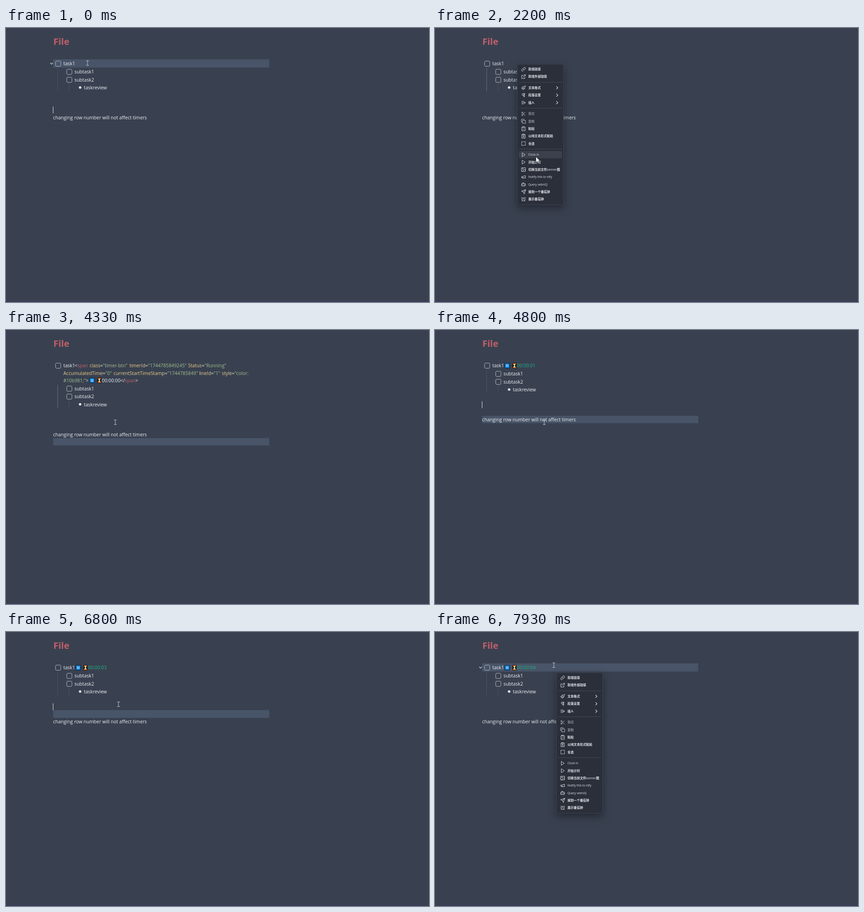
These frames come from a looping animation (929 by 603 pixels, 8 s). An HTML page with a canvas:

```html
<!DOCTYPE html>
<html lang="en">
<head>
<meta charset="utf-8">
<title>Task timer</title>
<style>
html, body { margin: 0; width: 100%; height: 100%; overflow: hidden; background: #394150; }
canvas { display: block; }
</style>
</head>
<body>
<canvas id="stage" width="929" height="603"></canvas>
<script>
const g = document.getElementById('stage').getContext('2d');
const LOOP = 8000;
const SANS = '"Open Sans", "Noto Sans", sans-serif';
const CJK = '"Noto Sans CJK SC", "Noto Sans CJK JP", "Noto Sans CJK", sans-serif';
const BODY = '10.3px ' + SANS;
const WHITE = '#eef0f4', RED = '#bf616a', YELLOW = '#ebcb8b', GREEN = '#a3be8c';

// Pointer stops: time, x, y
const PATH = [
  [0, 179, 77], [1270, 179, 77], [2000, 222, 284], [2200, 222, 284],
  [2530, 228, 334], [2930, 228, 334], [3530, 233, 300], [4200, 233, 300],
  [4330, 240, 203], [6600, 240, 203], [7070, 257, 92], [7400, 264, 88],
  [7470, 264, 86], [7700, 264, 86], [7900, 261, 73], [LOOP, 261, 73]
];
const CLICKS = [[530, 179, 77], [3670, 231, 299], [4440, 240, 203], [7470, 264, 86]];
const ROW_TOPS = [69, 87, 104.5, 122, 140, 156, 172, 188.5, 205, 221];

// Icons on a 24-unit grid
const CLIP = 'M9 2h6v4H9zM16 4h4v18H4V4h4';
const PLAY = 'M6 3 20 12 6 21z';
const ICONS = {
  link: 'M10 13a5 5 0 0 0 7.5.5l3-3a5 5 0 0 0-7-7l-1.7 1.7M14 11a5 5 0 0 0-7.5-.5l-3 3a5 5 0 0 0 7 7l1.7-1.7',
  open: 'M15 3h6v6M10 14 21 3M18 13v8H3V6h8',
  brush: 'M20 2 14 7l-3-2-3 2 9 9 2-3-2-3 5-6zM9 8c-2 3-4 3.5-7 4l8 10c2-1 6-5 6-7M14 17 5 15',
  para: 'M13 4v16M17 4v16M19 4H9.5a4.5 4.5 0 0 0 0 9H13',
  insert: 'M3 6h11M3 12h18M3 18h11M17 8l4 4-4 4',
  cut: 'M3 6a3 3 0 1 0 6 0 3 3 0 1 0-6 0M3 18a3 3 0 1 0 6 0 3 3 0 1 0-6 0M20 4 8 16M14.5 14.5 20 20M8 8l4 4',
  copy: 'M8 8h14v14H8zM4 16H2V2h14v2',
  paste: CLIP + 'M9 14l2 2 4-4',
  plain: CLIP + 'M9 12v-1h6v1M11 17h2M12 11v6',
  all: 'M3 6V3h3M9 3h2M14 3h2M18 3h3v3M21 9v2M21 14v2M21 18v3h-3M15 21h-2M10 21H8M6 21H3v-3M3 15v-2M3 10V8',
  play: PLAY,
  image: 'M3 3h18v18H3zM7 9a2 2 0 1 0 4 0 2 2 0 1 0-4 0M21 15l-4-4L6 21',
  horn: 'M3 11 21 6v12L3 14zM11.6 16.8a3 3 0 1 1-5.8-1.6',
  bot: 'M12 8V4H8M4 8h16v12H4zM2 14h2M20 14h2M15 13v2M9 13v2',
  send: 'M22 2 2 9l9 4 4 9zM22 2 11 13',
  alarm: 'M4 13a8 8 0 1 0 16 0 8 8 0 1 0-16 0M12 9v4l2 2M5 3 2 6M22 6l-3-3M6.4 18.7 4 21M17.6 18.7 20 21'
};
for (const k in ICONS) ICONS[k] = new Path2D(ICONS[k]);

const GROUPS = [
  [['link', '新增链接'], ['open', '新增外部链接']],
  [['brush', '文本格式', 'sub'], ['para', '段落设置', 'sub'], ['insert', '插入', 'sub']],
  [['cut', '剪切', 'dim'], ['copy', '复制', 'dim'], ['paste', '粘贴'], ['plain', '以纯文本形式粘贴'], ['all', '全选']],
  [['play', 'Clock in'], ['play', '开始计时'], ['image', '切换当前文件banner图'], ['horn', 'Notify this to ntfy'],
   ['bot', 'Query velmIQ'], ['send', '规划一个番茄钟'], ['alarm', '展示番茄钟']]
];

function text(str, x, y, color = WHITE, font = BODY) {
  g.font = font;
  g.fillStyle = color;
  g.fillText(str, x, y);
  return x + g.measureText(str).width;
}

function run(x, y, ...parts) {
  for (const [str, color] of parts) x = text(str, x, y, color);
}

const attr = (x, y, name, value) => run(x, y, [name, YELLOW], ['=', WHITE], [value, GREEN]);

function rect(x, y, w, h, color) {
  g.fillStyle = color;
  g.fillRect(x, y, w, h);
}

function line(color, width, ...pts) {
  g.strokeStyle = color;
  g.lineWidth = width;
  g.beginPath();
  for (const [x, y] of pts) g.lineTo(x, y);
  g.stroke();
}

function round(x, y, w, h, r) {
  g.beginPath();
  g.roundRect(x, y, w, h, r);
}

function disc(x, y, r, color) {
  g.fillStyle = color;
  g.beginPath();
  g.arc(x, y, r, 0, 7);
  g.fill();
}

function pointerAt(t) {
  t = Math.max(0, t);
  const i = Math.max(1, PATH.findIndex(p => p[0] > t));
  const [t0, x0, y0] = PATH[i - 1], [t1, x1, y1] = PATH[i];
  const u = (t - t0) / (t1 - t0), s = u * u * (3 - 2 * u);
  return { x: x0 + (x1 - x0) * s, y: y0 + (y1 - y0) * s };
}

function menuAt(t) {
  if (t >= 600 && t < 3800) return { x: 180, y: 79 };
  if (t >= 7600) return { x: 266, y: 89 };
  return null;
}

const inside = (p, m) => m && p.x > m.x && p.x < m.x + 103 && p.y > m.y && p.y < m.y + 310;

function checkbox(x, y) {
  round(x - 5.5, y - 5.5, 11.5, 11.5, 2.5);
  g.strokeStyle = '#b3bac6';
  g.lineWidth = 1;
  g.stroke();
}

function timerIcons(x, y) {
  round(x - 6, y - 6, 12, 12, 1);
  g.fillStyle = '#14202e';
  g.fill();
  rect(x - 5, y - 5, 10, 10, '#0078d7');
  rect(x - 2.2, y - 3, 1.3, 6, '#fff');
  rect(x + 1, y - 3, 1.3, 6, '#fff');
  const h = x + 16;
  rect(h - 4.5, y - 6, 9, 12, '#1b1b1f');
  rect(h - 3.5, y - 5, 7, 1.6, '#f7630c');
  rect(h - 3.5, y + 3.4, 7, 1.6, '#f7630c');
  g.fillStyle = '#ffe9a6';
  g.beginPath();
  for (const [dx, dy] of [[-2.6, -3.4], [2.6, -3.4], [.6, 0], [2.6, 3.4], [-2.6, 3.4], [-.6, 0]]) g.lineTo(h + dx, y + dy);
  g.fill();
}

function drawCode(clock) {
  run(151, 82, ['<', WHITE], ['span', RED]);
  attr(184, 82, 'class', '"timer-btn"');
  attr(271, 82, 'timerId', '"1744785849245"');
  attr(400, 82, 'Status', '"Running"');
  attr(126, 98.5, 'AccumulatedTime', '"0"');
  attr(236, 98.5, 'currentStartTimeStamp', '"1744785849"');
  attr(424, 98.5, 'lineId', '"1"');
  attr(474, 98.5, 'style', '"color:');
  run(126, 115, ['#10b981;"', GREEN], ['>', WHITE]);
  timerIcons(189, 111);
  run(210.5, 115, [clock + '</', WHITE], ['span', RED], ['>', WHITE]);
}

function drawNote(t) {
  const expanded = t >= 3860 && t < 4530;
  const shift = expanded ? 32.5 : 0;
  const lag = pointerAt(t - 60);
  const clock = '00:00:0' + Math.max(0, Math.floor((t - 3730) / 1000));

  const tops = ROW_TOPS.map((y, i) => i ? y + shift : y);
  const row = tops.findIndex((y, i) => lag.y >= y && lag.y < tops[i + 1]);
  const hover = row >= 0 && !inside(lag, menuAt(t));
  if (hover) {
    const y = Math.round(tops[row]);
    rect(103.5, y, 474.5, Math.round(tops[row + 1]) - y, '#485468');
  }

  text('File', 104, 37, '#c25e69', 'bold 20px ' + SANS);
  if (hover && row === 0) line('#dfe3ea', 1.2, [97.2, 76.7], [100, 79.7], [102.8, 76.7]);

  const active = t >= 530 && t < 4500;
  line(active ? '#667083' : '#495264', 1, [113.5, 88 + shift], [113.5, 139 + shift]);
  line('#495264', 1, [138.5, 122 + shift], [138.5, 139 + shift]);

  checkbox(114.3, 78.3);
  text('task1', 126, 82);
  if (expanded) drawCode(clock);
  else if (t >= 4530) {
    timerIcons(158.5, 78.5);
    text(clock, 180, 82, '#1fb286');
  }
  checkbox(138.8, 96.3 + shift);
  text('subtask1', 150.3, 100 + shift);
  checkbox(138.8, 113.8 + shift);
  text('subtask2', 150.3, 117.5 + shift);
  disc(162.8, 131 + shift, 2.8, '#dfe3ea');
  text('taskreview', 171, 135.3 + shift);
  text('changing row number will not affect timers', 103.5, 201.2 + shift);
  drawCaret(t, shift);
}

function drawCaret(t, shift) {
  const lit = base => t >= base && Math.floor((t - base) / 533) % 2 === 0;
  const bar = (x, y) => rect(x, y, 1, 15, '#dfe3ea');
  if (t < 530) bar(103, 173);
  else if (t < 4463) { if (lit(597)) bar(151, 70); }
  else if (t < 7470 && lit(4463)) bar(103, 157 + shift);
}

function drawLabel(str, x, y, dim) {
  for (const part of str.split(/([ -~]+)/)) {
    const latin = /^[ -~]/.test(part);
    const font = latin ? '6.5px ' + SANS : (dim ? '' : 'bold ') + '6.8px ' + CJK;
    x = text(part, x, y, dim ? '#c3c7d0' : '#e6e8ed', font);
  }
}

function drawMenu({ x, y }, pointer) {
  g.save();
  g.shadowColor = 'rgba(0,0,0,.38)';
  g.shadowBlur = 18;
  g.shadowOffsetY = 7;
  round(x, y, 103, 310.5, 5);
  g.fillStyle = '#2b2f3a';
  g.fill();
  g.restore();
  round(x + .5, y + .5, 102, 309.5, 5);
  g.strokeStyle = '#3f4553';
  g.lineWidth = 1;
  g.stroke();

  let cy = y + 11.6;
  GROUPS.forEach((items, n) => {
    if (n) {
      rect(x + 4, Math.round(cy - 4.4), 95, 1, '#434854');
      cy += 8.4;
    }
    for (const [icon, label, kind] of items) {
      if (inside(pointer, { x, y }) && Math.abs(pointer.y - cy) < 8.15) {
        round(x + 4, cy - 8, 95, 16, 2.5);
        g.fillStyle = '#3c404c';
        g.fill();
      }
      g.save();
      g.translate(x + 9, cy - 5.3);
      g.scale(.45, .45);
      g.strokeStyle = kind === 'dim' ? '#ced2d9' : '#e6e8ed';
      g.lineWidth = 2;
      g.lineCap = g.lineJoin = 'round';
      g.stroke(ICONS[icon]);
      g.restore();
      drawLabel(label, x + 25, cy + 2.5, kind === 'dim');
      if (kind === 'sub') line('#e6e8ed', 1.1, [x + 86.5, cy - 3.3], [x + 89.8, cy], [x + 86.5, cy + 3.3]);
      cy += 16.3;
    }
  });
}

function drawClicks(t) {
  for (const [start, x, y] of CLICKS) {
    const age = t - start;
    if (age < 0 || age > 260) continue;
    g.globalAlpha = .68 * Math.min(1, (260 - age) / 100);
    disc(x, y, 14 + 6 * Math.min(1, age / 50), '#2838d8');
    g.globalAlpha = 1;
  }
}

function drawPointer(t, { x, y }) {
  if (inside({ x, y }, menuAt(t)) && t < 3700) {
    g.beginPath();
    for (const [dx, dy] of [[0, 0], [0, 11], [2.6, 8.7], [4.4, 12.8], [6.2, 12], [4.4, 8], [8, 8]]) g.lineTo(x + dx, y + dy);
    g.closePath();
    g.strokeStyle = '#15171c';
    g.lineWidth = 1.2;
    g.stroke();
    g.fillStyle = '#fff';
    g.fill();
  } else {
    x = Math.round(x);
    y = Math.round(y);
    rect(x - .5, y - 5, 1, 10, '#c3c7cd');
    rect(x - 3, y - 5.5, 6, 1, '#c3c7cd');
    rect(x - 3, y + 4.5, 6, 1, '#c3c7cd');
  }
}

function draw(t) {
  const pointer = pointerAt(t), menu = menuAt(t);
  rect(0, 0, 929, 603, '#394150');
  rect(0, 602, 929, 1, '#38386a');
  drawNote(t);
  if (menu) drawMenu(menu, pointer);
  drawClicks(t);
  drawPointer(t, pointer);
}

const begin = performance.now();
function tick() {
  draw((performance.now() - begin) % LOOP);
  requestAnimationFrame(tick);
}
tick();
</script>
</body>
</html>
```
